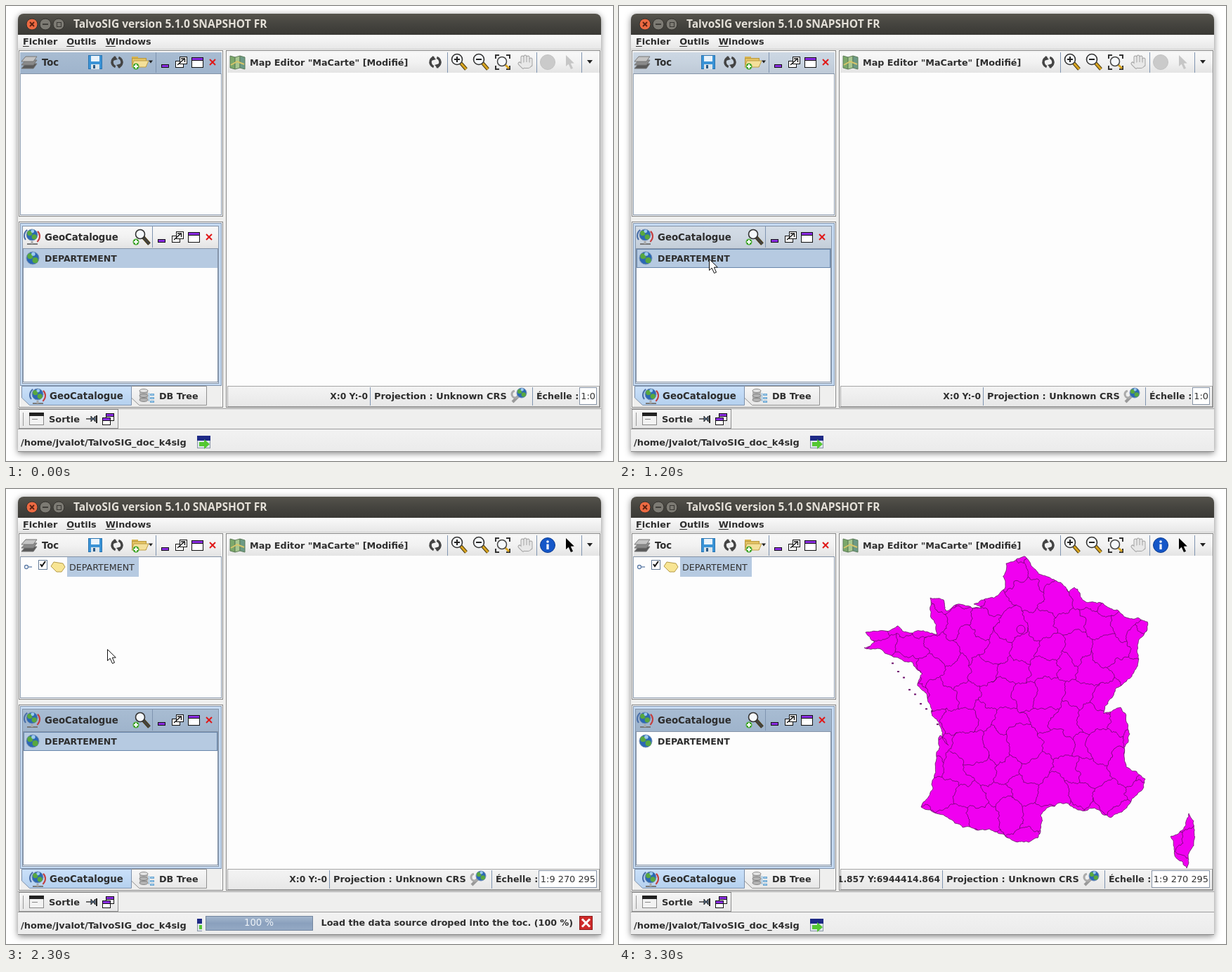
Animation, 864 px wide and 648 px high, one loop 3.4 s. Source, as an HTML page with a canvas:

```html
<!DOCTYPE html>
<html lang="fr">
<head>
<meta charset="utf-8">
<style>
html, body { margin: 0; width: 100%; height: 100%; overflow: hidden; background: #fff; }
canvas { display: block; }
</style>
</head>
<body>
<canvas id="stage" width="864" height="648"></canvas>
<script>
const ctx = document.getElementById('stage').getContext('2d');
const LOOP = 3400, STEP = 100;
const INK = '#2e2e2e', EDGE = '#8594a8', SELECT = '#b6cae1', PURPLE = '#8a2be2';

// ---------- drawing helpers ----------
function box(x, y, w, h, fill, stroke) {
  if (fill) { ctx.fillStyle = fill; ctx.fillRect(x, y, w, h); }
  if (stroke) {
    ctx.strokeStyle = stroke; ctx.lineWidth = 1;
    ctx.strokeRect(x + .5, y + .5, w - 1, h - 1);
  }
}
function trace(pts) {
  ctx.beginPath();
  for (let i = 0; i < pts.length; i += 2) ctx.lineTo(pts[i], pts[i + 1]);
}
function line(color, width, ...pts) {
  trace(pts); ctx.strokeStyle = color; ctx.lineWidth = width; ctx.stroke();
}
function poly(fill, stroke, ...pts) {
  trace(pts); ctx.closePath();
  ctx.fillStyle = fill; ctx.fill();
  if (stroke) { ctx.strokeStyle = stroke; ctx.lineWidth = 1; ctx.stroke(); }
}
function disc(x, y, r, fill, stroke, width = 1, ry = r) {
  ctx.beginPath(); ctx.ellipse(x, y, r, ry, 0, 0, 7);
  if (fill) { ctx.fillStyle = fill; ctx.fill(); }
  if (stroke) { ctx.strokeStyle = stroke; ctx.lineWidth = width; ctx.stroke(); }
}
function arc(x, y, r, a, b, color, width) {
  ctx.beginPath(); ctx.arc(x, y, r, a, b);
  ctx.strokeStyle = color; ctx.lineWidth = width; ctx.stroke();
}
function cross(x, y, r, color, width) {
  line(color, width, x - r, y - r, x + r, y + r);
  line(color, width, x + r, y - r, x - r, y + r);
}
function plus(x, y, r, color, width) {
  line(color, width, x - r, y, x + r, y);
  line(color, width, x, y - r, x, y + r);
}
function text(s, x, y, size = 12.8, color = INK, weight = 'bold', align = 'left') {
  ctx.font = `${weight} ${size}px "DejaVu Sans", sans-serif`;
  ctx.fillStyle = color; ctx.textAlign = align;
  ctx.fillText(s, x, y);
}
function fade(y, h, ...colors) {
  const g = ctx.createLinearGradient(0, y, 0, y + h);
  colors.forEach((c, i) => g.addColorStop(i / (colors.length - 1), c));
  return g;
}
function clipped(x, y, w, h, draw) {
  ctx.save();
  ctx.beginPath(); ctx.rect(x, y, w, h); ctx.clip();
  draw();
  ctx.restore();
}

// ---------- map: key points joined by fractal coasts, borders on a jittered honeycomb ----------
const MAINLAND = [578,96, 597,121, 623,131, 641,147, 648,140, 660,158, 692,166, 722,183, 752,189,
  738,222, 733,261, 708,283, 690,320, 714,311, 727,349, 722,396, 749,413, 747,424, 716,460,
  700,468, 650,455, 627,447, 600,464, 596,497, 570,502, 527,484, 478,476, 430,453, 446,415,
  457,351, 469,365, 456,335, 443,307, 425,280, 432,263, 397,240, 349,226, 364,218, 351,204,
  396,195, 413,205, 453,207, 443,155, 462,158, 466,174, 516,170, 505,164, 548,143, 551,106];
const ISLE = [811,462, 819,485, 818,508, 808,540, 791,522, 785,495, 807,478];

const noise = (a, b) => {
  const s = Math.sin(a * 12.9898 + b * 78.233) * 43758.5453;
  return s - Math.floor(s) - .5;
};
function jag(path, x0, y0, x1, y1, depth, amp) {
  if (!depth) { path.lineTo(x1, y1); return; }
  const k = noise(x0 + x1, y0 + y1) * amp;
  const mx = (x0 + x1) / 2 - (y1 - y0) * k, my = (y0 + y1) / 2 + (x1 - x0) * k;
  jag(path, x0, y0, mx, my, depth - 1, amp);
  jag(path, mx, my, x1, y1, depth - 1, amp);
}
function jagPath(path, pts, depth, amp) {
  path.moveTo(pts[0], pts[1]);
  for (let i = 2; i < pts.length; i += 2) {
    jag(path, pts[i - 2], pts[i - 1], pts[i], pts[i + 1], depth, amp);
  }
}
const land = new Path2D(), borders = new Path2D();
for (const shore of [MAINLAND, ISLE]) {
  jagPath(land, [...shore, shore[0], shore[1]], 4, .3);
  land.closePath();
}
const corner = (x, y) => [x + noise(x, y) * 18, y + noise(y, x + 9) * 16];
for (let r = 0; r < 14; r++) {
  for (let c = 0; c < 13; c++) {
    const x = 338 + c * 40 + (r % 2) * 20, y = 84 + r * 35;
    jagPath(borders, [...corner(x - 20, y - 12), ...corner(x, y - 23),
      ...corner(x + 20, y - 12), ...corner(x + 20, y + 12)], 4, .5);
  }
}
borders.moveTo(578, 200);
borders.arc(572, 200, 6, 0, 7);

function drawMap() {
  ctx.save();
  ctx.fillStyle = '#f000f0'; ctx.fill(land);
  ctx.strokeStyle = '#50104f'; ctx.lineWidth = .7; ctx.stroke(land);
  ctx.clip(land);
  ctx.stroke(borders);
  ctx.restore();
  for (let i = 0; i < 9; i++) {
    box(388 + i * 8, 250 + i * 10 + noise(i, 3) * 12, 3, 2, '#70106f');
  }
}

// ---------- icons ----------
function globe(x, y, r) {
  disc(x, y, r, '#2c68b4', '#7792b5');
  disc(x - r * .4, y - r * .3, r * .45, '#58a83f');
  disc(x + r * .4, y + r * .35, r * .45, '#58a83f');
  disc(x + r * .1, y - r * .65, r * .3, '#9bc9f0');
}
function catalogIcon(x, y) {
  line('#777', 2, x - 7, y + 11, x + 8, y + 11);
  line('#aaa', 3, x, y + 7, x, y + 11);
  globe(x, y - 2, 8);
  arc(x + 1, y, 10, -.8, .9, '#c43c3c', 2);
  arc(x - 1, y - 1, 10, 2.5, 4.1, '#4a6fa8', 2);
}
function layersIcon(x, y) {
  ['#5a5a5a', '#8a8a8a', '#c4c4c4'].forEach((c, i) => {
    const d = y + 5 - i * 5;
    poly(c, '#777', x - 11, d + 4, x - 5, d - 3, x + 11, d - 3, x + 6, d + 4);
  });
}
function floppyIcon(x, y) {
  box(x - 10, y - 10, 20, 20, '#3a93d6', '#2a74b0');
  box(x - 6, y - 9, 12, 8, '#eaf3fb');
  box(x - 6, y + 3, 12, 7, '#dbe4ea');
  box(x - 3, y + 4, 3, 5, '#2b5a86');
}
function refreshIcon(x, y) {
  for (const turn of [0, Math.PI]) {
    ctx.save();
    ctx.translate(x, y); ctx.rotate(turn);
    arc(0, 0, 7, 1.9, 4.5, '#444', 3.5);
    poly('#444', null, -4, -9, 1, -4, -6, -2);
    ctx.restore();
  }
}
function plusBadge(x, y) {
  disc(x, y, 4.5, '#46a832');
  plus(x, y, 3, '#fff', 2);
}
function folderIcon(x, y) {
  box(x - 11, y - 8, 9, 4, '#d9b550');
  box(x - 11, y - 6, 21, 13, '#e3c262', '#b8973c');
  poly('#f4e09a', '#bf9f48', x - 8, y - 2, x + 13, y - 2, x + 9, y + 7, x - 11, y + 7);
  plusBadge(x - 5, y + 6);
}
function lens(x, y, r, sign, handle = '#d9a520') {
  line('#4a3a10', 5, x + r - 2, y + r - 2, x + 13, y + 14);
  line(handle, 3, x + r - 2, y + r - 2, x + 13, y + 14);
  disc(x, y, r, '#f5f8fb', '#333', 1.6);
  if (sign === '+') plus(x, y, 4, '#222', 2);
  if (sign === '-') line('#222', 2, x - 4, y, x + 4, y);
}
function extentIcon(x, y) {
  for (const a of [-1, 1]) for (const b of [-1, 1]) {
    line('#333', 2, x + a * 10, y + b * 5, x + a * 10, y + b * 10, x + a * 5, y + b * 10);
  }
  line('#d9a520', 3, x + 4, y + 4, x + 9, y + 9);
  disc(x - 1, y - 1, 6.5, '#f5f8fb', '#444', 1.5);
}
function handIcon(x, y) {
  ctx.lineCap = 'round';
  for (const [color, width] of [['#a2a2a2', 5], ['#e8e8e8', 3]]) {
    for (let i = 0; i < 4; i++) {
      line(color, width, x - 4 + i * 4, y + 4, x - 4 + i * 4, y - 8 + (i - 1) ** 2);
    }
    line(color, width, x - 8, y + 2, x - 3, y + 7);
    line(color, width + 5, x, y + 4, x + 4, y + 4);
  }
  ctx.lineCap = 'butt';
}
function mapIcon(x, y) {
  ['#7ca86a', '#a8c890', '#6d9a86'].forEach((c, i) => {
    const l = x - 10 + i * 7, d = i % 2 ? 2 : 0;
    poly(c, '#5d7c58', l, y - 9 + d, l + 7, y - 7 - d, l + 7, y + 10 - d, l, y + 8 + d);
  });
  line('#d8c56a', 2, x - 9, y + 4, x, y - 1, x + 10, y + 3);
}
function wrenchIcon(x, y) {
  line('#999', 4, x - 8, y + 9, x + 1, y);
  arc(x - 4, y - 2, 5, 0, 4.5, '#aaa', 3);
  globe(x + 5, y - 4, 7);
}
function databaseIcon(x, y) {
  box(x - 10, y - 7, 12, 13, '#b4b4b4');
  for (const d of [6, 0, -7]) disc(x - 4, y + d, 6, d < 0 ? '#e4e4e4' : '#b4b4b4', '#777', .8, 2.5);
  line('#7fb4dc', 1, x + 3.5, y - 4, x + 3.5, y + 8);
  for (const d of [-3, 2, 7]) box(x + 5, y + d, 6, 3, '#a9d3f0', '#6ba5d0');
}
function windowIcon(x, y, w, h) {
  box(x, y, w, h, '#fff', '#111');
  box(x + 1, y + 1, w - 2, 3, PURPLE);
  box(x, y + 4, w, 1, '#111');
}
function panelControls(x, y) {
  box(x - 73, y + 3, 11, 5, PURPLE, '#111');
  box(x - 53, y - 2, 12, 10, '#fff', '#111');
  box(x - 47, y - 8, 11, 11, '#fff', '#111');
  line('#111', 1.4, x - 50, y + 4, x - 40, y - 5);
  line('#111', 1.4, x - 45, y - 5, x - 39.5, y - 5, x - 39.5, y);
  windowIcon(x - 30, y - 7, 17, 15);
  cross(x, y, 4, '#e01818', 2);
}
function dropMark(x, y, s) {
  poly('#222', null, x - s, y - s / 2, x + s, y - s / 2, x, y + s / 2 + 1);
}
function arrow(x, y, fill, stroke) {
  ctx.save();
  ctx.translate(x, y);
  poly(fill, stroke, 0, 0, 0, 16, 3.7, 12.7, 7, 20, 10, 18.7, 6.8, 11.7, 11.8, 11.5);
  ctx.restore();
}

// ---------- panels ----------
function header(x, y, w, h, focus) {
  box(x, y, w, h, fade(y, h, '#f8f8f8', '#f1f1f1', '#e3e3e3'));
  ctx.globalAlpha = focus;
  box(x, y, w, h, fade(y, h, '#a8bcd2', '#9fb4cc'));
  ctx.globalAlpha = 1;
}
function frame(x, y, w, h) {
  box(x, y, w, h, '#f2f2f2', '#858585');
  box(x + 1, y + 1, w - 2, h - 2, null, '#fff');
}
const divider = (x, y, h) => box(x, y, 1, h, '#7f94b0');

function tab(x, w, top, bottom, edge) {
  poly(fade(541, 28, top, bottom), edge, x, 541.5, x + w, 541.5, x + w, 568.5, x + 11, 568.5, x, 558);
}

function drawWindow() {
  ctx.save();
  ctx.shadowColor = 'rgba(0,0,0,.5)'; ctx.shadowBlur = 10; ctx.shadowOffsetY = 2;
  ctx.beginPath(); ctx.roundRect(17, 11, 830, 624, [8, 8, 0, 0]);
  ctx.fillStyle = '#efefee'; ctx.fill();
  ctx.restore();
  ctx.beginPath(); ctx.roundRect(17, 11, 830, 30, [8, 8, 0, 0]);
  ctx.fillStyle = fade(11, 30, '#55534c', '#45443f', '#3a3935'); ctx.fill();
  for (let i = 0; i < 3; i++) disc(37 + i * 19, 26, 8, i ? '#7c7a73' : '#ec6a42', '#33312d');
  cross(37, 26, 3, '#5a2010', 1.8);
  line('#3a3935', 1.8, 52, 26, 60, 26);
  box(72, 23, 7, 7, null, '#3a3935');
  ctx.font = 'bold 15.5px "Open Sans", sans-serif';
  ctx.fillStyle = '#e4e0d8'; ctx.textAlign = 'left';
  ctx.fillText('TalvoSIG version 5.1.0 SNAPSHOT FR', 96, 31);
  box(17, 41, 830, 21, fade(41, 21, '#fafafa', '#e6e6e6'));
  box(17, 61, 830, 1, '#cfcfcf');
  let x = 24;
  for (const item of ['Fichier', 'Outils', 'Windows']) {
    text(item, x, 55, 12.8);
    box(x, 57, ctx.measureText(item[0]).width, 1, INK);
    x += ctx.measureText(item).width + 13;
  }
}

function drawToc(s) {
  frame(18, 63, 291, 237);
  header(20, 66, 287, 30, 1 - s.focus);
  box(20, 96, 287, 202, '#fdfdfd', EDGE);
  layersIcon(33, 80);
  text('Toc', 51, 85, 13.2);
  floppyIcon(127, 80); refreshIcon(158, 80); folderIcon(190, 80);
  dropMark(206, 79, 3);
  divider(213, 66, 29);
  panelControls(294, 80);
  if (!s.loaded) return;
  disc(29, 111, 2.5, '#fff', '#5f7ea8', 1.3);
  line('#5f7ea8', 1.3, 32, 111, 37, 111);
  box(46, 101, 13, 14, '#fff', '#637a96');
  line('#111', 2, 49, 107, 51, 110, 56, 103);
  poly('#f8e594', '#b49a48', 64, 110, 68, 104, 81, 106, 84, 111, 79, 118, 72, 118, 68, 114);
  box(87, 97, 102, 28, SELECT);
  text('DEPARTEMENT', 90, 116, 12.65, '#333', 'normal');
}

function drawCatalog(s) {
  frame(18, 307, 291, 265);
  box(20, 309, 287, 232, '#c6dbf3', '#7e91ab');
  box(23, 313, 280, 225, '#eef2f7', EDGE);
  header(24, 314, 278, 31, s.focus);
  box(24, 345, 278, 191, '#fdfdfd', EDGE);
  catalogIcon(37, 328);
  text('GeoCatalogue', 55, 334, 13.3);
  lens(191, 325, 6.5, '', '#444');
  plusBadge(185, 336);
  divider(208, 314, 30);
  panelControls(289, 329);
  if (s.selected) box(25, 346, 276, 27, SELECT, s.focus ? '#6886ab' : null);
  globe(38, 359, 9);
  text('DEPARTEMENT', 55, 364, 12.5);
  box(20, 541, 287, 30, '#efefee');
  tab(178.5, 107, '#f8f8f8', '#e6e6e6', '#909090');
  tab(22.5, 156, '#cbe1fa', '#b4d0ee', '#7e91ab');
  catalogIcon(45, 555);
  text('GeoCatalogue', 62, 560, 13.3);
  databaseIcon(200, 555);
  text('DB Tree', 218, 560, 12.75);
}

function drawEditor(s) {
  frame(313, 63, 533, 509);
  header(315, 66, 530, 30, 0);
  box(315, 95, 530, 446, '#fdfdfd');
  mapIcon(329, 80);
  text('Map Editor "MaCarte" [Modifié]', 347, 85, 12.76);
  refreshIcon(611, 80);
  lens(642, 76, 7.5, '+'); lens(673, 76, 7.5, '-');
  extentIcon(707, 80); handIcon(739, 80);
  for (const x of [628, 755, 819]) divider(x, 66, 29);
  disc(771, 80, 10.5, s.loaded ? '#1557c8' : '#cacaca', s.loaded ? '#0b3b92' : '#c2c2c2');
  if (s.loaded) {
    disc(771, 75, 1.8, '#fff');
    line('#fff', 3.2, 771, 78.5, 771, 86);
  }
  arrow(797, 70, s.loaded ? '#000' : '#c6c6c6');
  dropMark(831, 79, 4);
  if (s.drawn) drawMap();

  // The left part of the bar shifts when the scale field widens.
  box(315, 541, 530, 30, fade(541, 30, '#f4f4f4', '#e7e7e7'), '#a5a5a5');
  const d = s.loaded ? -58 : 0;
  clipped(314, 542, 500, 28, () =>
    text(s.hovered ? 'X:652101.857 Y:6944414.864' : 'X:0 Y:-0', 515 + d, 560, 12.3, INK, 'bold', 'right'));
  divider(518 + d, 543, 26);
  text('Projection : Unknown CRS', 524 + d, 560, 12.9);
  wrenchIcon(729 + d, 555);
  divider(749 + d, 543, 26);
  text('Échelle :', 755 + d, 560, 12.6);
  box(816 + d, 543, 25 - d, 25, '#fff', '#8794a6');
  text(s.loaded ? '1:9 270 295' : '1:0', 839, 560, 12.9, '#333', 'normal', 'right');
}

function drawFooter(s) {
  box(17, 573, 830, 1, '#9c9c9c');
  box(18, 574, 142, 28, fade(574, 28, '#f7f7f7', '#e6e6e6'), '#8f8f8f');
  box(24, 579, 1, 19, '#999');
  box(33, 579, 21, 18, '#f2f2f2', '#888');
  box(33, 579, 21, 5, '#222');
  line('#888', 1, 37, 588.5, 45, 588.5);
  text('Sortie', 61, 593, 12.95);
  line('#222', 1.3, 114, 588, 121, 588);
  poly('#5c7a9c', '#222', 121, 584, 127, 592, 127, 584, 121, 592);
  line('#222', 2, 129, 583, 129, 594);
  windowIcon(142, 580, 12, 11);
  windowIcon(137, 586, 12, 11);

  box(17, 602, 830, 33, fade(602, 33, '#f2f2f2', '#ebebeb'));
  box(17, 602, 830, 1, '#9c9c9c');
  text('/home/jvalot/TalvoSIG_doc_k4sig', 21, 626, 12.95);
  const job = s.job;
  clipped(270, 606, job ? job.x - 275 : 24, 28, () => {
    box(272, 612, 19, 18, '#dfe6ee', '#8a96a6');
    box(272, 612, 19, 7, '#1e2a86');
    line('#54c832', 6, 275, 624, 283, 624);
    poly('#54c832', null, 282, 617, 290, 624, 282, 631);
  });
  if (job) {
    box(job.x, 608, 153, 21, '#eef1f5', '#72859f');
    box(job.x + 1, 609, Math.round(151 * job.done / 100), 19, fade(609, 19, '#a3b6cd', '#8aa0bd', '#94a9c4'));
    text(job.done + ' %', job.x + 76, 622, 13.2, '#eef3f8', 'normal', 'center');
    text(`${job.label} (${job.done} %)`, 807, 622, 12.7, INK, 'bold', 'right');
    box(816, 608, 19, 20, '#cf2a2a', '#8c1a1a');
    cross(825.5, 618, 5.5, '#fff', 3);
  }
  box(17, 634, 830, 1, '#8a8a8a');
}

// ---------- timeline ----------
const ramp = (t, from, to) => Math.max(0, Math.min(1, (t - from) / (to - from)));
const ease = u => u * u * (3 - 2 * u);

// Pointer stops: time, x, y
const ROUTE = [[400, 880, 140], [800, 145, 350], [1000, 128, 360], [1200, 128, 360],
  [1600, 145, 257], [1800, 144, 228], [2300, 144, 228], [2700, 890, 170]];

function pointer(t) {
  const i = ROUTE.findIndex(stop => stop[0] > t);
  if (i < 1) return null;
  const [t0, x0, y0] = ROUTE[i - 1], [t1, x1, y1] = ROUTE[i];
  const e = ease(ramp(t, t0, t1));
  return [Math.round(x0 + (x1 - x0) * e), Math.round(y0 + (y1 - y0) * e)];
}
function currentJob(t) {
  if (t < 2000 || t >= 2800) return null;
  return t < 2400
    ? { x: 284, done: Math.round(ramp(t, 1900, 2300) * 100), label: 'Load the data source droped into the toc.' }
    : { x: 293, done: Math.round(ramp(t, 2300, 2788) * 100), label: 'Drawing DEPARTEMENT (Rule Default Rule)' };
}
function drawPointer(t) {
  const p = pointer(t);
  if (!p) return;
  const [x, y] = p;
  arrow(x + .5, y + .5, '#fff', '#111');
  if (t < 1300 || t >= 1800) return;
  box(x + 3, y + 18, 13, 11, '#fff', '#111');
  box(x + 11, y + 21, 13, 12, '#fff', '#111');
  plus(x + 17.5, y + 27.5, 3.5, '#111', 1);
}
function render(t) {
  const s = {
    focus: ramp(t, 1100, 1320),
    selected: t < 2500,
    loaded: t >= 2100,
    hovered: t >= 2500,
    drawn: t >= 2800,
    job: currentJob(t)
  };
  box(0, 0, 864, 648, '#fff');
  drawWindow();
  drawToc(s);
  drawCatalog(s);
  drawEditor(s);
  drawFooter(s);
  drawPointer(t);
}

let start = null;
function tick(now) {
  if (start === null) start = now;
  render(Math.floor((now - start) % LOOP / STEP) * STEP);
  requestAnimationFrame(tick);
}
render(0);
requestAnimationFrame(tick);
</script>
</body>
</html>
```
